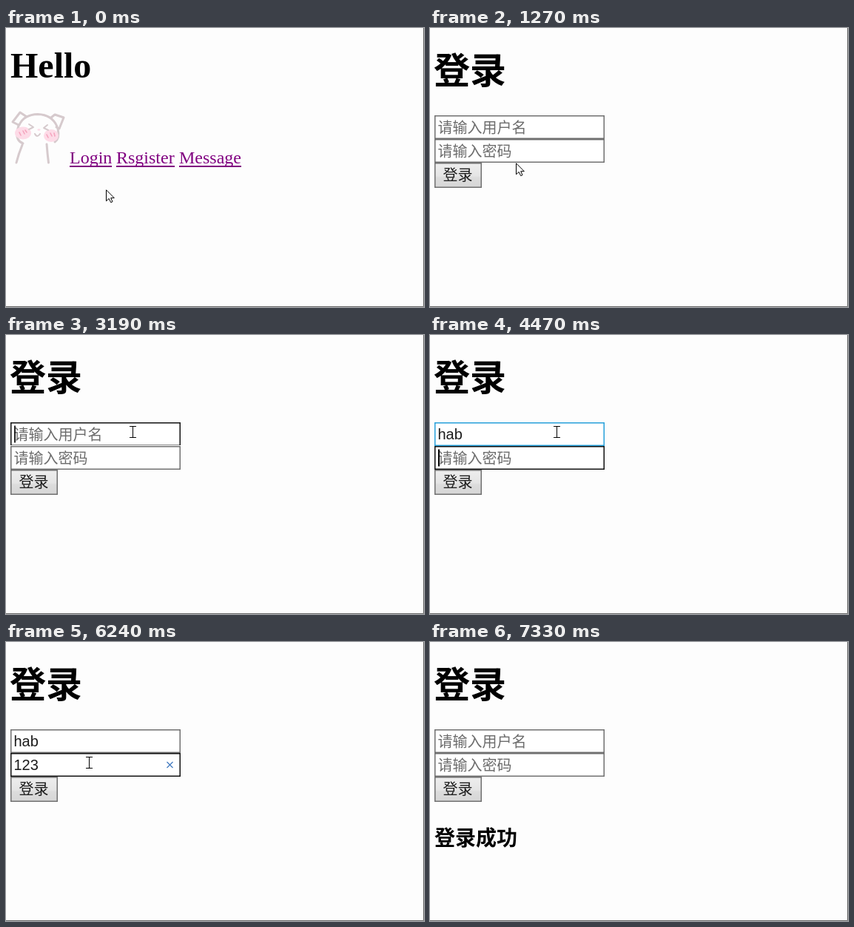
An HTML page for the animation above (7920 ms loop, 565 by 377 pixels).

```html
<!DOCTYPE html>
<html lang="zh-CN">
<head>
<meta charset="utf-8">
<title>登录</title>
<style>
html, body { margin: 0; width: 100%; height: 100%; overflow: hidden; background: #fdfdfd; }
svg { display: block; width: 565px; height: 377px; }
text { white-space: pre; }
.zh { font: 20px "Noto Sans CJK SC", "Noto Sans CJK", sans-serif; }
.title { font-size: 49px; font-weight: 700; }
.note { font-size: 28px; font-weight: 700; }
.serif { font: 24px "Liberation Serif", serif; }
.hello { font-size: 48px; font-weight: 700; }
.typed { font: 20px "Liberation Sans", sans-serif; fill: #1c1c1c; }
.hint { fill: #6c6c6c; }
.box { fill: #fff; stroke-width: 1.5; }
.clear { stroke: #4079bf; stroke-width: 1.2; }
</style>
</head>
<body>
<svg viewBox="0 0 565 377">
  <defs>
    <linearGradient id="grey" x2="0" y2="1">
      <stop offset="0" stop-color="#eee"/><stop offset=".52" stop-color="#e5e5e5"/>
      <stop offset=".6" stop-color="#dcdcdc"/><stop offset="1" stop-color="#d6d6d6"/>
    </linearGradient>
  </defs>
  <rect width="565" height="377" fill="#fdfdfd"/>
  <path d="M564.5 0V376.5H0" fill="none" stroke="#666"/>

  <g id="home">
    <text class="serif hello" x="6" y="67">Hello</text>
    <g fill="none" stroke="#d6cacd" stroke-width="3" stroke-linecap="round" stroke-linejoin="round">
      <path d="M18 131Q24 117 43 116.500Q62 117 69 133M17 131L9 127L19 114L28 120M61 121L66 117L78 121L72 136L68 134"/>
      <path d="M17 132Q13 145 16 150Q18 154 23 156M70 136Q73 149 66 154M22 158Q17 170 14 182M55 157Q56 170 57.500 182"/>
      <g stroke="none" fill="#fddbe7">
        <ellipse cx="23" cy="142" rx="11" ry="8.500"/><ellipse cx="61" cy="145.500" rx="10" ry="8.500"/>
      </g>
      <path d="M18 141L20 145M23 139L25 143M26 138L28 141M55 144L57 148M60 142L62 146M65 142L66 146" stroke="#f5a5be" stroke-width="1.600"/>
      <path d="M31 130L37 134L31 137M56 131L51 135L57 138M39 143Q42 149 46 143" stroke-width="2"/>
      <ellipse cx="44.500" cy="137.500" rx="2" ry="1.200" fill="#fddbe7" stroke="none"/>
    </g>
    <g class="serif" fill="#800080">
      <text x="86" y="183">Login</text><rect x="86" y="186" width="57" height="2"/>
      <text x="149" y="183">Rsgister</text><rect x="149" y="186" width="79" height="2"/>
      <text x="234" y="183">Message</text><rect x="234" y="186" width="84" height="2"/>
    </g>
  </g>

  <g id="form">
    <text class="zh title" x="5" y="74.500">登录</text>
    <g id="fields"></g>
    <path id="edge" d="M6 149.500H236" stroke="#fdfdfd"/>
    <rect id="button" x="6.750" y="182.750" width="62.500" height="32.500" stroke-width="1.500"/>
    <text class="zh" x="17.500" y="206" fill="#1c1c1c">登录</text>
    <text id="done" class="zh note" x="6" y="275">登录成功</text>
    <rect id="caret" width="2" height="23"/>
  </g>

  <g id="arrow" fill="#fff" stroke="#000">
    <path d="M.5 .8V15.800L4.200 12.500L6.700 17.700L9 16.700L6.700 11.700H11.300Z"/>
  </g>
  <g id="beam" fill="none" stroke="#000">
    <path d="M-4.500 .5H4.500M-4.500 15.500H4.500M0 1V15"/>
  </g>
  <g id="hand" fill="#fff" stroke="#000" stroke-linejoin="round">
    <path d="M5.500 13V2Q5.500 .5 7 .5T8.500 2V7Q11 5.500 11.500 7.500Q13.500 6.500 14 8.500Q16.500 8 16.500 10.500V14Q16.500 16 14.500 18V20.500H6.500V18.500L.8 12Q0 9.500 2.500 10Z"/>
  </g>
</svg>
<script>
const LOOP = 7920, LOGIN = 1270, PRESS = 6700, SUBMIT = 6780;
const GREY = '#707070', BLUE = '#26a0da', BLACK = '#111';
const $ = id => document.getElementById(id);
const show = (el, on) => el.setAttribute('visibility', on ? 'inherit' : 'hidden');

// Rows start with the time at which they take effect.
const pointer = [
  [0, 'arrow', 135, 218], [90, 'arrow', 135, 222], [180, 'arrow', 131, 217],
  [270, 'arrow', 124, 207], [360, 'arrow', 117, 198], [450, 'arrow', 112, 191],
  [540, 'hand', 106, 188], [720, 'hand', 106, 185], [810, 'hand', 106, 182],
  [LOGIN, 'arrow', 116, 182], [1550, 'beam', 125, 164], [1640, 'beam', 138, 136],
  [1730, 'beam', 149, 119], [1880, 'beam', 157, 116], [1970, 'beam', 164, 118],
  [2060, 'beam', 169, 121], [2150, 'beam', 171, 123], [6070, 'beam', 152, 130],
  [6160, 'beam', 112, 155], [6250, 'arrow', 76, 188], [6340, 'arrow', 52, 202],
  [6420, 'arrow', 44, 206], [7150, 'arrow', 122, 241], [7240, 'arrow', 336, 324],
  [7330, 'none', 0, 0]
];
const hover = [[0, ''], [1550, 'pass'], [1640, 'user'], [6160, 'pass'], [6250, ''], [6340, 'button'], [SUBMIT, '']];
const focus = [[0, ''], [2240, 'user'], [4470, 'pass'], [PRESS, '']];
const blink = [
  [0, 1], [2640, .7], [2730, .3], [2820, 0], [3190, .85], [3280, 1],
  [4110, .6], [4200, 0], [4470, 1], [5640, .85], [5730, .4], [5820, 0], [6250, 1]
];
const fields = [
  { id: 'user', y: 118, hint: '请输入用户名', text: 'hab', keys: [3280, 3460, 3710], clearAt: 3370 },
  { id: 'pass', y: 150, hint: '请输入密码', text: '123', keys: [4810, 5090, 5270], clearAt: 4900 }
];

$('fields').innerHTML = fields.map(({ id, y, hint }) => `
  <g id="${id}">
    <rect class="box" x="6.75" y="${y + .75}" width="228.5" height="30.5"/>
    <text class="zh hint" x="10.5" y="${y + 23.5}">${hint}</text>
    <text class="typed" x="10.5" y="${y + 23}"></text>
    <path class="clear" d="M217.5 ${y + 12}l8 8m0-8l-8 8"/>
  </g>`).join('');
for (const f of fields) [f.box, f.hintEl, f.typed, f.clear] = $(f.id).children;

const at = (rows, t) => rows.findLast(row => row[0] <= t);

function drawField(f, t, focused, hovered) {
  const count = t < SUBMIT ? f.keys.filter(k => k <= t).length : 0;
  f.typed.textContent = f.text.slice(0, count);
  show(f.hintEl, !count);
  show(f.clear, focused && t >= f.clearAt);
  f.box.setAttribute('stroke', focused ? BLACK : hovered ? BLUE : GREY);
  if (focused) {
    $('caret').setAttribute('x', 11 + 11 * count);
    $('caret').setAttribute('y', f.y + 4.5);
  }
}

function drawButton(t, hovered) {
  const pressed = t >= PRESS && t < SUBMIT;
  $('button').setAttribute('fill', pressed ? '#33b3e3' : hovered ? '#dcf1fa' : 'url(#grey)');
  $('button').setAttribute('stroke', pressed ? '#1687b0' : hovered ? BLUE : GREY);
}

function draw(t) {
  const [, over] = at(hover, t), [, active] = at(focus, t);
  show($('home'), t < LOGIN);
  show($('form'), t >= LOGIN);
  show($('done'), t >= SUBMIT);
  show($('edge'), t >= 2240 && t < 3280);
  for (const f of fields) {
    // The hovered field keeps its blue border after the focus moves on.
    const lit = over === f.id;
    drawField(f, t, active === f.id, lit);
  }
  drawButton(t, over === 'button');
  show($('caret'), active);
  $('caret').setAttribute('opacity', at(blink, t)[1]);

  const [, kind, x, y] = at(pointer, t);
  for (const id of ['arrow', 'beam', 'hand']) {
    show($(id), id === kind);
    $(id).setAttribute('transform', `translate(${id === 'beam' ? x + .5 : x} ${y})`);
  }
}

const start = performance.now();
function tick() {
  draw((performance.now() - start) % LOOP);
  requestAnimationFrame(tick);
}
tick();
</script>
</body>
</html>
```
